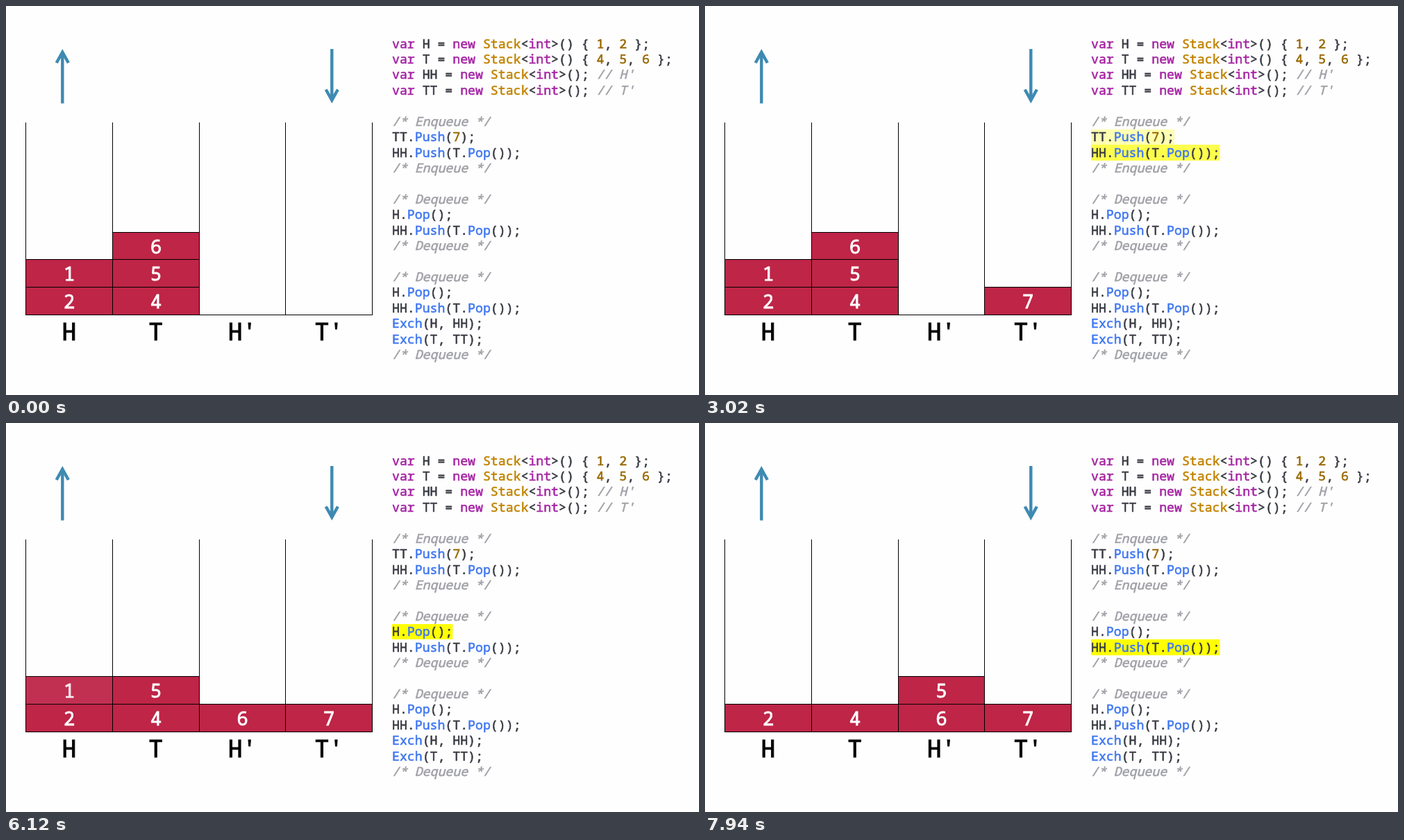
Write an HTML page with a canvas that moves like this. It is 998 px wide and 561 px high and loops after 8000 ms.

```html
<!DOCTYPE html>
<html lang="en">
<head>
<meta charset="utf-8">
<title>Queue from four stacks</title>
<style>
  html, body { margin: 0; width: 100%; height: 100%; overflow: hidden; background: #fefefe; }
  canvas { display: block; width: 998px; height: 561px; }
</style>
</head>
<body>
<canvas id="stage" width="998" height="561"></canvas>
<script>
const ctx = document.getElementById('stage').getContext('2d');
const LOOP = 8000;
const MONO = '"Noto Sans Mono", "DejaVu Sans Mono", monospace';
const WEIGHT = 0.032; // outline added to glyphs, in em

// Stacks
const LEFT = 28.5, COL = 124.75, TOP = 168, BASE = 445.6, ROW = 39.83;
const LABELS = ['H', 'T', "H'", "T'"];

// Code listing
const CODE_X = 556, CODE_Y = 60.6, LINE = 22.42, CODE_SIZE = 18.18, ADVANCE = 10.91;
const MARK_Y = 43.4;
const CODE = `var H = new Stack<int>() { 1, 2 };
var T = new Stack<int>() { 4, 5, 6 };
var HH = new Stack<int>(); // H'
var TT = new Stack<int>(); // T'

/* Enqueue */
TT.Push(7);
HH.Push(T.Pop());
/* Enqueue */

/* Dequeue */
H.Pop();
HH.Push(T.Pop());
/* Dequeue */

/* Dequeue */
H.Pop();
HH.Push(T.Pop());
Exch(H, HH);
Exch(T, TT);
/* Dequeue */`.split('\n');

const TOKEN = /(\/\*.*\*\/|\/\/.*)|\b(var|new|int)\b|\b(Stack)\b|\b(Push|Pop|Exch)\b|(\d)|[A-Z]+|[^\sA-Za-z\d]/g;
const COLORS = ['#a0a1a7', '#a626a4', '#c18401', '#4078f2', '#986801'];
const PLAIN = '#383a42';

// Slide changes: [start, end]
const STEPS = [
  [420, 1060], [1600, 2160], [2700, 3380], [3840, 4480],
  [4980, 5620], [6120, 6720], [7260, 7940]
];

// Items appear during step "on" and vanish during step "off"
const CELLS = [
  { n: 2, col: 0, row: 0 },
  { n: 1, col: 0, row: 1, off: 5 },
  { n: 4, col: 1, row: 0 },
  { n: 5, col: 1, row: 1, off: 6 },
  { n: 6, col: 1, row: 2, off: 3 },
  { n: 7, col: 3, row: 0, on: 1 },
  { n: 6, col: 2, row: 0, on: 3 },
  { n: 5, col: 2, row: 1, on: 6 }
];
const MARKS = [
  { line: 6, on: 0, off: 2 },
  { line: 7, on: 2, off: 4 },
  { line: 11, on: 4, off: 6 },
  { line: 12, on: 6 }
];

const clamp = v => Math.max(0, Math.min(1, v));
const snap = v => Math.floor(v) + 0.5;
const colX = i => snap(LEFT + i * COL);
const rowY = i => snap(BASE - i * ROW);

function progress(step, t) {
  const [start, end] = STEPS[step];
  return t < start ? 0 : Math.sin(clamp((t - start + 20) / (end - start + 20)) * Math.PI / 2);
}

function fade(item, t) {
  const enter = item.on === undefined ? 1 : progress(item.on, t);
  const leave = item.off === undefined ? 0 : progress(item.off, t);
  return { shape: enter * (1 - leave), text: clamp(enter * 2 - 1) * clamp(1 - leave / 0.36) };
}

function stroke(points, color, width) {
  ctx.strokeStyle = color;
  ctx.lineWidth = width;
  ctx.beginPath();
  points.forEach(([x, y]) => ctx.lineTo(x, y));
  ctx.stroke();
}

function arrow(x, tail, tip) {
  const d = Math.sign(tail - tip), neck = tip + 4.6 * d, wing = tip + 20 * d;
  stroke([[x, tail], [x, neck]], '#3e8ab2', 4.4);
  stroke([[x - 8.6, wing], [x, neck], [x + 8.6, wing]], '#3e8ab2', 4.4);
}

function text(str, x, y, size, color, style = '') {
  ctx.font = `${style} 400 ${size}px ${MONO}`;
  ctx.fillStyle = ctx.strokeStyle = color;
  ctx.lineWidth = size * WEIGHT;
  ctx.fillText(str, x, y);
  ctx.strokeText(str, x, y);
}

function drawFrame() {
  for (let i = 0; i <= 4; i++) {
    stroke([[colX(i), TOP], [colX(i), rowY(0) + 0.5]], '#000', 1);
  }
  stroke([[colX(0), rowY(0)], [colX(4), rowY(0)]], '#000', 1);
  ctx.textAlign = 'center';
  LABELS.forEach((s, i) => text(s, LEFT + (i + 0.5) * COL, 481.5, 34, '#000'));
}

function drawCell(cell, t) {
  const { shape, text: ink } = fade(cell, t);
  if (!shape) return;
  const x = colX(cell.col), y = rowY(cell.row + 1);
  const w = colX(cell.col + 1) - x, h = rowY(cell.row) - y;
  ctx.globalAlpha = shape;
  ctx.fillStyle = '#be2547';
  ctx.fillRect(x, y, w, h);
  ctx.strokeStyle = '#000';
  ctx.lineWidth = 1;
  ctx.strokeRect(x, y, w, h);
  ctx.globalAlpha = ink;
  text(cell.n, x + w / 2, y + 30.7, 27, '#fff');
  ctx.globalAlpha = 1;
}

function drawMark(mark, t) {
  const top = Math.round(MARK_Y + mark.line * LINE);
  const bottom = Math.round(MARK_Y + (mark.line + 1) * LINE);
  ctx.globalAlpha = fade(mark, t).shape;
  ctx.fillStyle = '#ff0';
  ctx.fillRect(CODE_X, top, CODE[mark.line].length * ADVANCE, bottom - top);
  ctx.globalAlpha = 1;
}

function drawCode() {
  ctx.textAlign = 'left';
  CODE.forEach((line, i) => {
    for (const m of line.matchAll(TOKEN)) {
      const kind = m.slice(1).findIndex(Boolean);
      text(m[0], CODE_X + m.index * ADVANCE, CODE_Y + i * LINE, CODE_SIZE,
        COLORS[kind] || PLAIN, kind === 0 ? 'italic' : '');
    }
  });
}

function draw(now) {
  const t = now % LOOP;
  ctx.fillStyle = '#fefefe';
  ctx.fillRect(0, 0, 998, 561);
  arrow(81.3, 140.5, 62);
  arrow(469.3, 62, 140.5);
  drawFrame();
  CELLS.forEach(c => drawCell(c, t));
  MARKS.forEach(m => drawMark(m, t));
  drawCode();
  requestAnimationFrame(draw);
}

draw(0);
</script>
</body>
</html>
```
